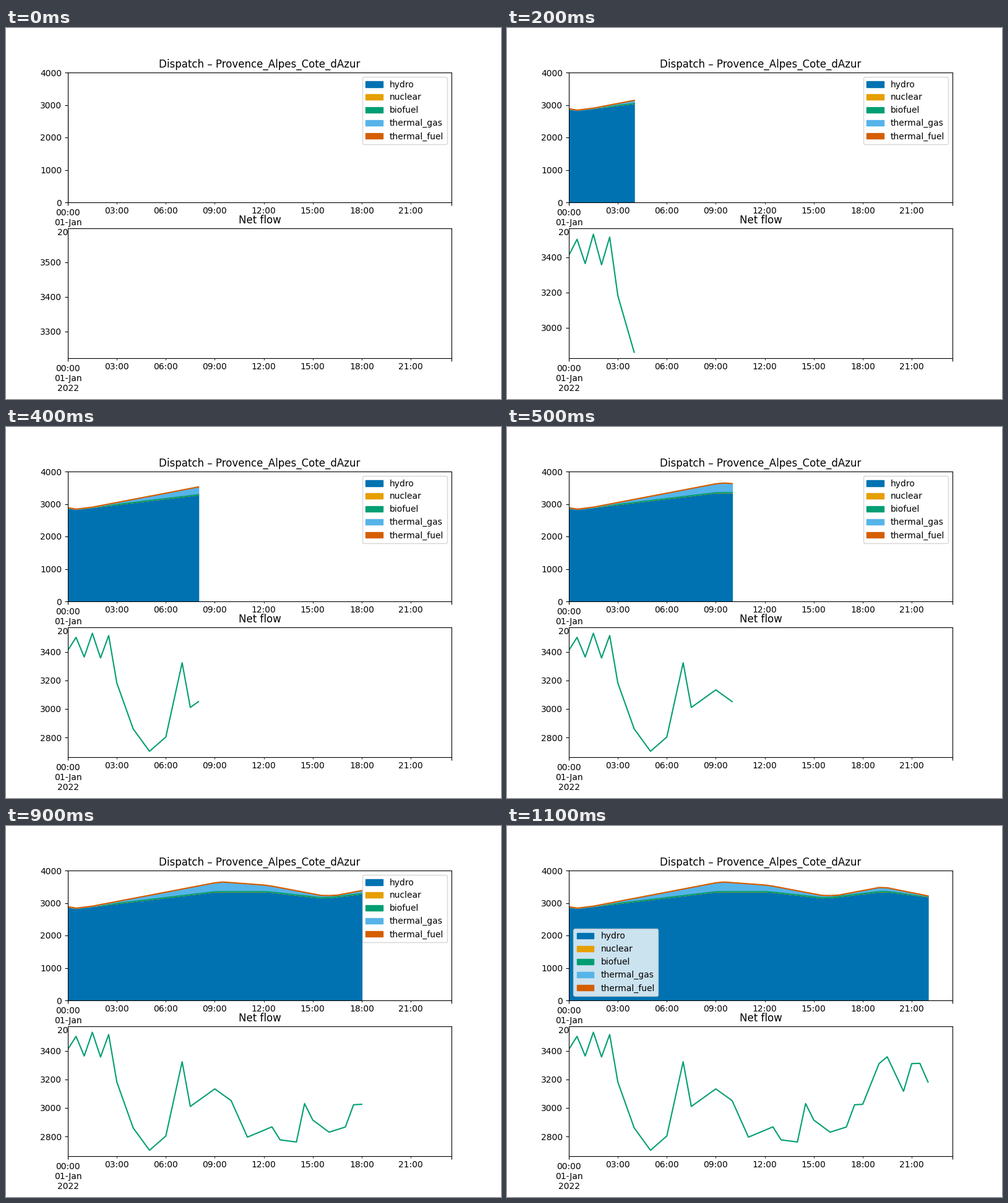
Animation of 800x600 px, one loop 1200 ms. Source, as a matplotlib script:

```python
import matplotlib.pyplot as plt
import numpy as np
from matplotlib.animation import FuncAnimation

FRAMES, INTERVAL = 12, 100
STEPS_PER_FRAME = 4
END = 23.5

COLORS = {
    "hydro": "#0072B2",
    "nuclear": "#E69F00",
    "biofuel": "#009E73",
    "thermal_gas": "#56B4E9",
    "thermal_fuel": "#D55E00",
}

hours = np.arange((FRAMES - 1) * STEPS_PER_FRAME + 1) / 2


def ramp(*points):
    """Piecewise linear series through (hour, value) turning points."""
    return np.interp(hours, *zip(*points))


# Power by technology; gas covers what is left of the demand
demand = ramp((0, 2899), (0.5, 2858), (1.5, 2920), (9, 3640), (9.5, 3662),
              (12.2, 3562), (15.6, 3240), (16.4, 3250), (19, 3494),
              (19.5, 3484), (22, 3232))
hydro = ramp((0, 2876), (0.5, 2838), (1.5, 2898), (9, 3348), (12.2, 3348),
             (15.7, 3150), (19, 3348), (19.5, 3348), (22, 3194))
nuclear = np.zeros_like(hours)
biofuel = ramp((1.5, 0), (3, 40), (20, 45), (22, 18))
fuel = np.full_like(hours, 14)
gas = np.maximum(demand - hydro - biofuel - fuel, 0)
tops = np.cumsum([hydro, nuclear, biofuel, gas, fuel], axis=0)

# Net flow: a swelling zigzag at night, then the swings of the day
swell = 88.3 * np.sin(np.pi * (2 * hours + 1) / 8.6)
night = 3442 - swell * np.cos(2 * np.pi * hours)
day = ramp((3, 3181), (4, 2860), (5, 2703), (6, 2803), (7, 3323), (7.5, 3010),
           (9, 3133), (10, 3051), (11, 2795), (12.5, 2867), (13, 2776),
           (14, 2761), (14.5, 3030), (15, 2915), (16, 2830), (17, 2866),
           (17.5, 3022), (18, 3025), (19, 3310), (19.5, 3358), (20.5, 3116),
           (21, 3310), (21.5, 3312), (22, 3181))
flow = np.where(hours < 3, night, day)

fig, (top, bottom) = plt.subplots(2, 1, figsize=(8, 6), dpi=100)


def style(ax, title):
    ax.set_title(title)
    ax.set_xlim(0, END)
    ax.set_xticks([0, END], ["00:00\n01-Jan\n2022", ""])
    marks = range(3, 24, 3)
    ax.set_xticks(marks, [f"{h:02d}:00" for h in marks], minor=True)


def update(frame):
    n = frame * STEPS_PER_FRAME + 1
    x = hours[:n]

    top.clear()
    base = np.zeros(n)
    for (name, color), y in zip(COLORS.items(), tops):
        top.fill_between(x, base, y[:n], color=color, label=name)
        base = y[:n]
    style(top, "Dispatch – Provence_Alpes_Cote_dAzur")
    top.set_ylim(0, 4000)
    # The legend moves once the area would run underneath it
    top.legend(loc="upper right" if x[-1] <= 18 else "lower left")

    bottom.clear()
    bottom.plot(x, flow[:n], color=COLORS["biofuel"])
    style(bottom, "Net flow")


anim = FuncAnimation(fig, update, frames=FRAMES, interval=INTERVAL,
                     repeat=True, repeat_delay=0)
plt.show()
```
